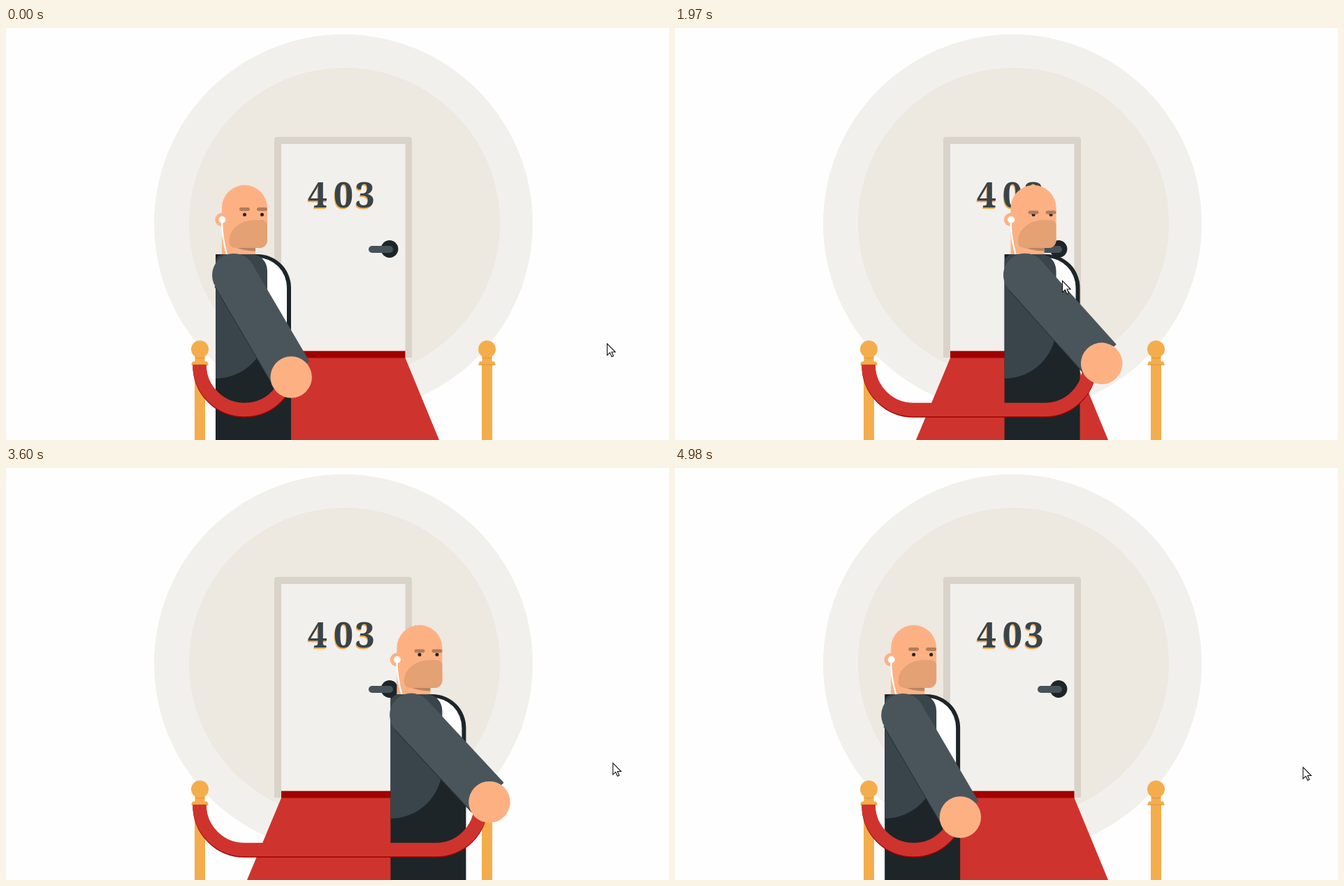
An HTML page that plays this animation: 949x590 px, repeating every 5.1 s.

```html
<!DOCTYPE html>
<html lang="en">
<head>
<meta charset="utf-8">
<title>403</title>
<style>
  html, body { margin: 0; width: 100%; height: 100%; overflow: hidden; background: #fefefe; }
  svg { display: block; width: 949px; height: 590px; }
  text { font: 900 50px "Noto Serif", "Liberation Serif", serif; }
</style>
</head>
<body>
<svg viewBox="0 0 949 590">
  <defs>
    <g id="post" fill="#f4ad4c">
      <path d="M270 480H285V590H270Z"/>
      <circle cx="277.5" cy="460" r="12.5"/>
      <path d="M270.5 469H284.5V477.5H288L290 482.5H265L267 477.5H270.5Z"/>
      <path d="M270.5 471.7Q277.5 474.5 284.5 471.7M266 482.3H289" fill="none" stroke="#dd9437"/>
    </g>
  </defs>

  <circle cx="483" cy="280" r="271" fill="#f2f0ec"/>
  <circle cx="484.5" cy="279.5" r="222.5" fill="#ede8e0"/>

  <g id="door">
    <path d="M384 472V160Q384 156 388 156H577Q581 156 581 160V472Z" fill="#d9d3ca"/>
    <path d="M394 166H571.5V463H394Z" fill="#f2f0ec"/>
    <path d="M394 462.5H571.5V473H394Z" fill="#a00000"/>
    <text x="431 468 499" y="258.5" fill="#f7ab4a">403</text>
    <text x="432 469 500" y="256.5" fill="#38444b">403</text>
    <circle cx="549" cy="316.5" r="12.4" fill="#1d2528"/>
    <rect x="519" y="312" width="35" height="10" rx="5" fill="#465259"/>
  </g>
  <path d="M394 472.5H571.5L620 590H345Z" fill="#ce342d"/>

  <use href="#post"/>
  <use href="#post" x="411"/>

  <g id="guard">
    <path d="M300 590V324H360A48 48 0 0 1 408 372V590Z" fill="#1d2528"/>
    <path d="M330 329H360A42 43 0 0 1 402 372V440H330Z" fill="#fff"/>
    <path d="M300 502V336A12 12 0 0 1 312 324H352A22 24 0 0 1 374 348V428A74 74 0 0 1 300 502Z" fill="#39454b"/>
    <circle cx="309" cy="274.5" r="9.7" fill="#fdb183"/>
    <path d="M309 324V257.500A32.500 32.500 0 0 1 374 257.500V304A11 11 0 0 1 363 315H357V324Z" fill="#fdb183"/>
    <path d="M325 313H357V319.500Q340 319 325 313Z" fill="#b98460"/>
    <path d="M319.500 306V304A37 29 0 0 1 356 275H366A8 8 0 0 1 374 283V304A11 11 0 0 1 363 315H331Q319.500 315 319.500 306Z" fill="#e3a174"/>
    <g fill="#1d2528">
      <circle cx="341.500" cy="267.300" r="2.500"/>
      <circle cx="366.500" cy="267.300" r="2.500"/>
    </g>
    <path id="brows" d="M336.500 259.500H346.500M361.500 259.500H371.500" stroke="#b27d5b" stroke-width="5" stroke-linecap="round"/>
    <path d="M309 276Q309 300 316 324" fill="none" stroke="#fff" stroke-width="2.400"/>
    <circle cx="309.500" cy="274.500" r="5" fill="#fff"/>
  </g>

  <g fill="none" stroke-width="19.500">
    <path class="rope" stroke="#a00000" transform="translate(0 1.500)"/>
    <path class="rope" stroke="#ce342d"/>
  </g>

  <g id="arm">
    <path d="M326 354L407.500 493" stroke="#27333a" stroke-width="62" transform="translate(-.9 .5)"/>
    <circle cx="326" cy="354" r="31" fill="#4a555b"/>
    <path d="M326 354L407.500 493" stroke="#4a555b" stroke-width="62"/>
    <circle cx="408.200" cy="500" r="29.700" fill="#fdb183"/>
  </g>

  <path id="cursor" d="M0 0V16.500L3.900 12.900 6.500 18.800 9 17.700 6.500 12H11.700Z" fill="#fff" stroke="#111" stroke-width="1.100"/>
</svg>
<script>
  const LOOP = 5100, ENTER = 1389, LEAVE = 3532;
  const TRAVEL = 258, SWING = 13.2, FROWN = 4.6;
  const ROPE_GAIN = 1.093;

  // time, x, y of the pointer tip
  const pointer = [
    [0, 860.5, 452], [1179, 860.5, 452], [1180, 854.5, 449], [1240, 800, 432],
    [1390, 584, 372], [1470, 560, 362], [1690, 554.5, 362], [3180, 554.5, 362],
    [3480, 576, 367], [3532, 640, 382], [3600, 868.5, 422.5],
    [3720, 898, 428], [3780, 899, 428.5], [LOOP, 899, 428.5]
  ];

  const $ = id => document.getElementById(id);
  const guard = $('guard'), arm = $('arm'), brows = $('brows'), cursor = $('cursor');
  const ropes = document.querySelectorAll('.rope');

  // the CSS "ease" curve
  function ease(t) {
    if (t <= 0) return 0;
    if (t >= 1) return 1;
    let lo = 0, hi = 1, s;
    for (let i = 0; i < 24; i++) {
      s = (lo + hi) / 2;
      if (0.75 * s * (1 - s) + s ** 3 < t) lo = s; else hi = s;
    }
    return 0.3 * s * (1 - s) ** 2 + 3 * s * s * (1 - s) + s ** 3;
  }

  const hover = (t, duration) =>
    ease((t - ENTER) / duration) - ease((t - LEAVE) / duration);

  function pointerAt(t) {
    const i = pointer.findIndex(key => key[0] > t);
    const [t0, x0, y0] = pointer[i - 1], [t1, x1, y1] = pointer[i];
    const k = (t - t0) / (t1 - t0);
    return [x0 + (x1 - x0) * k, y0 + (y1 - y0) * k];
  }

  const move = (el, x, y, extra = '') =>
    el.setAttribute('transform', `translate(${x} ${y}) ${extra}`);

  function draw(t) {
    const shift = TRAVEL * hover(t, 1500);
    move(guard, shift, 0);
    move(arm, shift, 0, `rotate(${-SWING * hover(t, 1000)} 326 337)`);
    move(brows, 0, FROWN * hover(t, 250));
    move(cursor, ...pointerAt(t));
    const d = `M277 482A64.500 64.500 0 0 0 341.500 546.500h${shift * ROPE_GAIN}a64.500 64.500 0 0 0 64.500 -64.500`;
    ropes.forEach(rope => rope.setAttribute('d', d));
  }

  const start = performance.now();
  function tick() {
    draw((performance.now() - start) % LOOP);
    requestAnimationFrame(tick);
  }
  tick();
</script>
</body>
</html>
```
